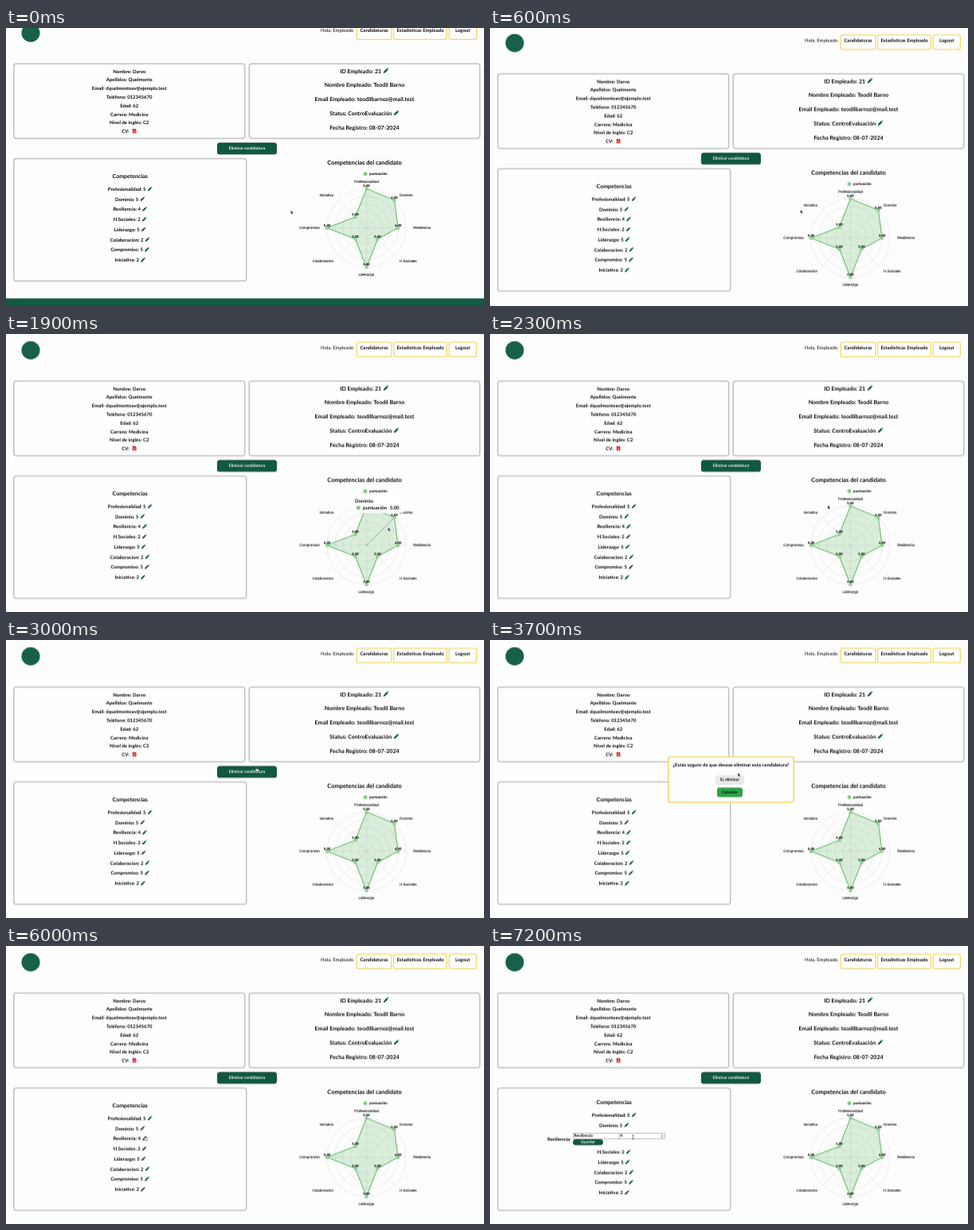
Animation of 600 by 350 pixels, one loop 8 s. Source, as an HTML page:

```html
<!DOCTYPE html>
<html lang="es">
<head>
<meta charset="utf-8">
<title>Candidatura</title>
<style>
/* 1rem is one stage pixel: laid out four times larger, then scaled down for subpixel precision */
html { font-size: 4px; }
html, body { margin: 0; width: 100%; height: 100%; overflow: hidden; background: #fdfdfd; }
body { position: relative; }
#stage { position: absolute; left: 0; top: 0; width: 600rem; height: 350rem; transform: scale(.25); transform-origin: 0 0; overflow: hidden; font: bold 6rem/10.8rem Lato, sans-serif; color: #080808; text-rendering: geometricPrecision; }
#stage * { box-sizing: border-box; }
.abs, #page, .card, .btn, .rows, #cursor, #cursor > * { position: absolute; }
#page { inset: 0; animation: scroll 8s infinite; }
.rows { text-align: center; white-space: nowrap; }
.rows > div { height: var(--h); line-height: var(--h); }
.icon { width: 1.06em; height: 1.06em; margin-left: .3em; vertical-align: -.1em; fill: #0f5a40; }
.card { border: 1.5rem solid #c0c0c2; border-radius: 4rem; background: #fefefe; }
.btn { display: flex; align-items: center; justify-content: center; white-space: nowrap; border-radius: 3rem; }
.nav { top: 9.7rem; height: 19.6rem; padding-bottom: 4rem; border: 1.4rem solid #f6d765; background: #fff; }
.green { background: #10583f; color: #fff; font-size: 5rem; }
#form { inset: 0; animation: form 8s step-end infinite; }
.field { position: absolute; top: 235.8rem; height: 7rem; border: .7rem solid #777; background: #fff; font-size: 5rem; line-height: 5.8rem; padding-left: 1rem; }
.upper { animation: upper 8s step-end infinite; }
.lower { animation: lower 8s step-end infinite; }
.edited { animation: edited 8s step-end infinite; }
#dialog { left: 223rem; top: 146.3rem; width: 159rem; height: 58.7rem; border: 1.6rem solid #f5d45c; border-radius: 3rem; background: #fefefe; animation: dialog 8s step-end infinite; }
#tip { width: 64rem; height: 21.5rem; border-radius: 2rem; background: #fff; white-space: nowrap; animation: tip 8s infinite, tipShown 8s step-end infinite; }
#tip span { position: absolute; line-height: 8rem; }
.first { animation: first 8s step-end infinite; }
.second { animation: second 8s step-end infinite; }
#chart { left: 0; top: 0; width: 600rem; height: 350rem; font: 4.5px "Liberation Sans", Arial, sans-serif; fill: #181818; }
#chart text { stroke: #181818; stroke-width: .1; }
#cursor { left: 0; top: 0; animation: cursor 8s linear infinite; }
#cursor > * { overflow: visible; left: 0; top: 0; width: 8rem; height: 8rem; }
#arrow { animation: arrow 8s step-end infinite; }
#hand { animation: hand 8s step-end infinite; }
#beam { animation: beam 8s step-end infinite; }

@keyframes scroll {
  0%, 3.75% { transform: translateY(-14.3rem); animation-timing-function: ease-out; }
  9%, 100% { transform: none; }
}
@keyframes cursor {
  0%, 3.75% { transform: translate(357.5rem, 229.5rem); }
  15%, 17.5% { transform: translate(453.5rem, 227rem); }
  23.5%, 25% { transform: translate(479.5rem, 243.5rem); }
  36.25%, 44% { transform: translate(313.5rem, 160rem); }
  53.75%, 59% { transform: translate(303rem, 190.5rem); }
  72.5%, 82.5% { transform: translate(173.5rem, 239.5rem); }
  88.75%, 100% { transform: translate(179.5rem, 240rem); }
}
@keyframes arrow {
  0%, 42.5%, 60%, 81.25% { opacity: 1; }
  35%, 51.25%, 72%, 87.5%, 100% { opacity: 0; }
}
@keyframes hand {
  0%, 42.5%, 60%, 81.25%, 100% { opacity: 0; }
  35%, 51.25%, 72% { opacity: 1; }
}
@keyframes beam { 0% { opacity: 0; } 87.5%, 100% { opacity: 1; } }
@keyframes dialog { 0%, 58.75%, 100% { opacity: 0; } 42.5% { opacity: 1; } }
@keyframes form { 0% { opacity: 0; } 81.25%, 100% { opacity: 1; } }
@keyframes edited { 0% { opacity: 1; } 81.25%, 100% { opacity: 0; } }
@keyframes upper { 0% { transform: none; } 81.25%, 100% { transform: translateY(-4.2rem); } }
@keyframes lower { 0% { transform: none; } 81.25%, 100% { transform: translateY(4.1rem); } }
@keyframes tip {
  0%, 18.75% { transform: translate(414rem, 215rem); }
  23%, 100% { transform: translate(435rem, 203.8rem); }
}
@keyframes tipShown { 0%, 28.75%, 100% { opacity: 0; } 13.75% { opacity: 1; } }
@keyframes first { 0%, 20%, 100% { opacity: 0; } 13.75% { opacity: 1; } }
@keyframes second { 0%, 28.75%, 100% { opacity: 0; } 20% { opacity: 1; } }
</style>
</head>
<body>
<svg width="0" height="0" style="position:absolute">
  <symbol id="pencil" viewBox="0 0 16 16"><path d="M.8 15.2l1.4-5L10 2.4 13.6 6l-7.8 7.8zM11 1.4L12.4.2l3.4 3.4-1.2 1.4z"/></symbol>
  <symbol id="pdf" viewBox="0 0 16 16"><path fill="#d8232a" d="M2 0h8l4 4v12H2z"/><path fill="none" stroke="#fff" d="M4.5 13C8 10 8 7 7.5 5c0 4 2 5.5 4 5.5-3 0-5 1-7 2.5"/></symbol>
</svg>

<div id="stage">
<div id="page">
  <div class="abs" style="left:19.5rem;top:9rem;width:23rem;height:23rem;border-radius:50%;background:#17604a"></div>
  <div class="abs" style="left:395rem;top:11.7rem;font-weight:400;white-space:nowrap">Hola, Empleado</div>
  <div class="btn nav" style="left:439.5rem;width:45rem">Candidaturas</div>
  <div class="btn nav" style="left:486rem;width:68rem">Estadísticas Empleado</div>
  <div class="btn nav" style="left:555.5rem;width:35.5rem">Logout</div>

  <div class="card" style="left:9rem;top:58.5rem;width:291.5rem;height:95.5rem"></div>
  <div class="card" style="left:304.5rem;top:58.5rem;width:291rem;height:95.5rem"></div>
  <div class="card" style="left:9rem;top:178rem;width:293.5rem;height:155.5rem"></div>

  <div class="rows" style="--h:10.8rem;left:9rem;width:291.5rem;top:63.4rem">
    <div>Nombre: Darvo</div>
    <div>Apellidos: Quelmonte</div>
    <div>Email: dquelmonteav@ejemplo.test</div>
    <div>Teléfono: 012345670</div>
    <div>Edad: 62</div>
    <div>Carrera: Medicina</div>
    <div>Nivel de inglés: C2</div>
    <div>CV: <svg class="icon"><use href="#pdf"/></svg></div>
  </div>
  <div class="rows" style="--h:17.75rem;left:304.5rem;width:291rem;top:59.5rem;font-size:7.02rem">
    <div>ID Empleado: 21<svg class="icon"><use href="#pencil"/></svg></div>
    <div>Nombre Empleado: Teodil Barno</div>
    <div>Email Empleado: teodilbarnoz@mail.test</div>
    <div>Status: CentroEvaluación<svg class="icon"><use href="#pencil"/></svg></div>
    <div>Fecha Registro: 08-07-2024</div>
  </div>

  <div class="btn green" style="left:265rem;top:158.7rem;width:75rem;height:14.8rem;border:.8rem solid #0a3d2b">Eliminar candidatura</div>

  <div class="rows upper" style="--h:12rem;left:9rem;width:293.5rem;top:194.4rem;font-size:7.02rem"><div>Competencias</div></div>
  <div class="rows" id="skills" style="--h:12.78rem;left:9rem;width:293.5rem;top:210.7rem"></div>

  <div class="abs" id="form">
    <div class="abs" style="left:72rem;top:237.8rem">Resiliencia:</div>
    <div class="field" style="left:104rem;width:58.5rem">Resiliencia</div>
    <div class="field" style="left:161.8rem;width:58rem">4</div>
    <svg class="abs" style="left:214rem;top:237rem;width:4rem;height:5rem" viewBox="0 0 4 5"><path d="M.8 2L2 .6 3.2 2M.8 3L2 4.4 3.2 3" fill="none" stroke="#444" stroke-width=".7"/></svg>
    <div class="btn green" style="left:104rem;top:243.3rem;width:38rem;height:7.4rem;border-radius:4rem">Guardar</div>
  </div>

  <div class="abs" style="left:304.5rem;width:291rem;top:178.5rem;text-align:center;font-size:7.45rem">Competencias del candidato</div>
  <svg class="abs" id="chart" viewBox="0 0 600 350"></svg>
  <div class="abs" id="tip">
    <span class="first" style="left:3rem;top:2.5rem">Profesionalidad</span>
    <span class="second" style="left:3rem;top:2.5rem">Dominio</span>
    <span style="left:5rem;top:12.7rem;width:4.5rem;height:4.5rem;background:#7cc47f"></span>
    <span style="left:13rem;top:10.9rem">puntuación</span>
    <span style="left:46.7rem;top:10.9rem">5.00</span>
  </div>

  <div class="abs" id="dialog">
    <div class="abs" style="left:0;right:0;top:4rem;text-align:center;white-space:nowrap">¿Estás seguro de que deseas eliminar esta candidatura?</div>
    <div class="btn" style="left:58.4rem;top:22.4rem;width:36rem;height:12rem;background:#e9e9ec;font-size:5rem">Sí, eliminar</div>
    <div class="btn" style="left:60.4rem;top:38rem;width:32rem;height:12rem;background:#2ba347;font-size:5rem">Cancelar</div>
  </div>

  <div class="abs" style="left:0;right:0;top:354.7rem;height:20rem;background:#125a40"></div>
</div>

<div id="cursor">
  <svg id="arrow" viewBox="0 0 8 8"><path d="M0 0v4.6l1.1-1 .8 1.8.9-.4-.8-1.7h1.4z" fill="#000" stroke="#fff" stroke-width=".4"/></svg>
  <svg id="hand" viewBox="0 0 8 8"><path d="M.2.5q.6-.8 1.1 0v1.7l2.3.6q.5.2.4.8l-.4 2H.8L-.9 3.4q.3-.6 1.1.1z" fill="#fff" stroke="#111" stroke-width=".5"/></svg>
  <svg id="beam" viewBox="0 0 8 8"><path d="M-1-2Q0-2 0-1.4 0-2 1-2M0-1.4v4M-1 3.2Q0 3.2 0 2.6q0 .6 1 .6" fill="none" stroke="#111" stroke-width=".6"/></svg>
</div>
</div>

<script>
const skills = [
  ['Profesionalidad', 5], ['Dominio', 5], ['Resiliencia', 4], ['H.Sociales', 2],
  ['Liderazgo', 5], ['Colaboracion', 2], ['Compromiso', 5], ['Iniciativa', 2]
];

document.getElementById('skills').innerHTML = skills.map(([name, score], i) => {
  const part = i < 2 ? 'upper' : i === 2 ? 'edited' : 'lower';
  return `<div class="${part}">${name}: ${score}<svg class="icon"><use href="#pencil"/></svg></div>`;
}).join('');

const cx = 452.5, cy = 266, unit = 9.9;
const polar = (i, r) => {
  const a = i * Math.PI / 4;
  return [cx + r * Math.sin(a), cy - r * Math.cos(a)];
};
const line = (i, attrs) => {
  const [x, y] = polar(i, 5 * unit);
  return `<line x1="${cx}" y1="${cy}" x2="${x}" y2="${y}" ${attrs}/>`;
};
const text = (x, y, anchor, str, attrs = '') =>
  `<text x="${x}" y="${y}" text-anchor="${anchor}" ${attrs}>${str}</text>`;

const points = skills.map(([, score], i) => polar(i, score * unit));
const faint = 'stroke="#c9c9c9" stroke-width=".5" stroke-dasharray="1.5 .8"';
const grid = [1, 2, 3, 4, 5].map(n =>
  `<circle cx="${cx}" cy="${cy}" r="${n * unit}" fill="none" ${faint}/>`);
const spokes = skills.map((_, i) => line(i, faint));
const dots = points.map(([x, y]) =>
  `<circle cx="${x}" cy="${y}" r="1.7" fill="#b5deb6" stroke="#66bb6a" stroke-width=".9"/>`);
const scores = points.map(([x, y], i) =>
  text(x, y - 1.9, 'middle', skills[i][1].toFixed(2), 'font-weight="bold" font-size="4.3"'));
const labels = skills.map(([name], i) => {
  const [x, y] = polar(i, 58.7);
  return text(x, y + 1.6, i % 4 ? (i < 4 ? 'start' : 'end') : 'middle', name);
});
const pointer = 'stroke="#555" stroke-width=".6" stroke-dasharray="2.5 1.5"';

document.getElementById('chart').innerHTML = [
  ...grid, ...spokes,
  `<polygon points="${points.join(' ')}" fill="#4caf50" fill-opacity=".2" stroke="#70c074" stroke-width="1.2"/>`,
  line(0, pointer + ' class="first"'),
  line(1, pointer + ' class="second"'),
  ...dots, ...scores, ...labels,
  `<circle cx="451" cy="198" r="2.1" fill="#86cb89" stroke="#66bb6a" stroke-width=".6"/>`,
  text(456, 199.6, 'start', 'puntuación', 'style="font:bold 4.5px Lato,sans-serif"')
].join('');
</script>
</body>
</html>
```
